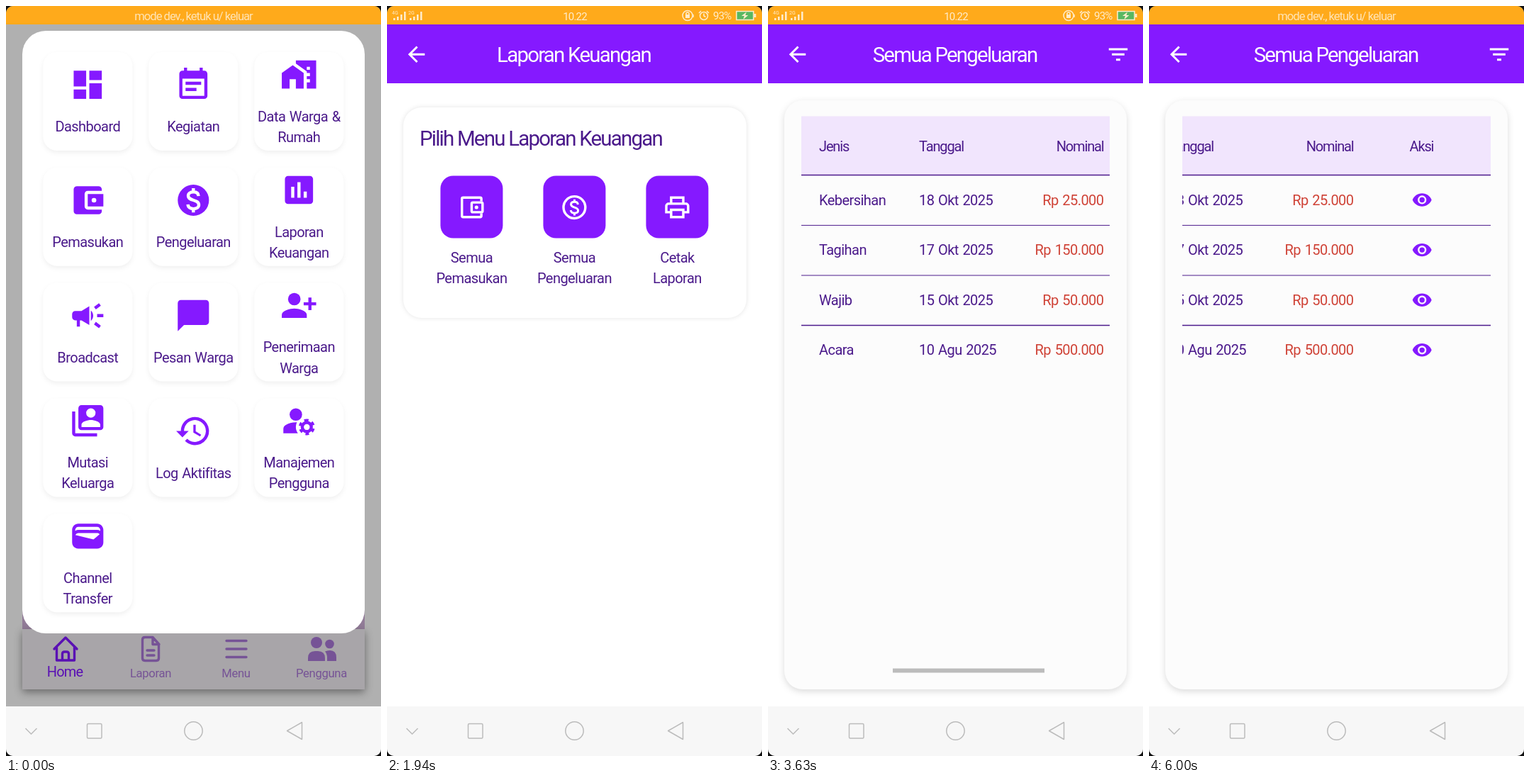
Recreate the animation shown at these times as an HTML page. Size 529 by 1058 pixels, loop 6.06 s.

```html
<!DOCTYPE html>
<html lang="id">
<head>
<meta charset="utf-8">
<title>Laporan Keuangan</title>
<style>
  html, body { margin: 0; width: 100%; height: 100%; overflow: hidden; background: #111; }
  svg { display: block; }
  #stage { width: 100%; height: 100%; }
  text { font: 20px Roboto, sans-serif; letter-spacing: -.55px; word-spacing: 1.2px; fill: #4b1a8b; }
  .mid { text-anchor: middle; }
  .end { text-anchor: end; }
  .title { font-size: 29.4px; letter-spacing: -1.75px; word-spacing: 0; }
  .bar .title { fill: #fff; }
  .head text { letter-spacing: -1.15px; }
  .red { fill: #cf4236; }
  .home { color: #5a10b4; }
  .tab { color: #765396; }
  .tab text { fill: currentColor; font-size: 16.6px; letter-spacing: -.3px; }
  .home text { fill: currentColor; letter-spacing: -.8px; }
  .tile { fill: #fff; filter: drop-shadow(0 3px 3px #0000000f); }
  .glow { fill: #fff; filter: drop-shadow(0 0 3px #0000001c); }
  .panel { fill: #fcfcfc; filter: drop-shadow(0 3px 5px #00000024); }
  .line { fill: none; stroke: currentColor; stroke-width: 2; }
  .bold { stroke-width: 3.4; stroke-linejoin: round; stroke-linecap: round; }
  .sys { fill: none; stroke: #bcbcbc; stroke-width: 1.5; stroke-linejoin: round; }
  .status text { fill: #fff; font-size: 15px; letter-spacing: -.8px; word-spacing: 0; }
  .status .dev { font-size: 16.6px; letter-spacing: -1px; }
  .status .net { font-size: 7px; letter-spacing: 0; }

  .dev, .info, .page, .scroll, .thumb, .thumb rect { animation: 6060ms linear infinite; }
  .dev { animation-name: dev; }
  .info { animation-name: info; }
  .page { transform-origin: 264px 507px; }
  #report { animation-name: openReport; }
  #list { animation-name: openList; }
  .scroll { animation-name: scroll; }
  .thumb { animation-name: thumbFade; }
  .thumb rect { animation-name: thumbMove; }

  @keyframes dev {
    0%, 9.9% { opacity: .68; } 13.4% { opacity: .3; }
    15.7%, 70.1% { opacity: 0; } 75%, 100% { opacity: .68; }
  }
  @keyframes info {
    0%, 23.1% { opacity: 0; } 29.7%, 64.4% { opacity: .78; } 69.3%, 100% { opacity: 0; }
  }
  @keyframes openReport {
    0%, 15% { opacity: 0; transform: scale(.9); animation-timing-function: ease-out; }
    20%, 100% { opacity: 1; transform: none; }
  }
  @keyframes openList {
    0%, 45.7% { opacity: 0; transform: scale(.9); animation-timing-function: ease-out; }
    50.7%, 100% { opacity: 1; transform: none; }
  }
  @keyframes scroll {
    0%, 53.5% { transform: translateX(0); animation-timing-function: ease-in-out; }
    59.9%, 60.6% { transform: translateX(-260px); animation-timing-function: ease-in-out; }
    68%, 100% { transform: translateX(-445px); }
  }
  @keyframes thumbMove {
    0%, 53.5% { transform: translateX(0); animation-timing-function: ease-in-out; }
    59.9%, 60.6% { transform: translateX(129px); animation-timing-function: ease-in-out; }
    68%, 100% { transform: translateX(221px); }
  }
  @keyframes thumbFade {
    0%, 52.8% { opacity: 0; } 53.6%, 77.9% { opacity: 1; } 82.4%, 100% { opacity: 0; }
  }
</style>
</head>
<body>
<svg id="stage" viewBox="0 0 529 1058" preserveAspectRatio="none">
  <defs>
    <clipPath id="screen"><rect width="529" height="1058" rx="10"/></clipPath>
    <clipPath id="body"><rect y="26" width="529" height="962"/></clipPath>
    <clipPath id="table"><rect x="47" y="155" width="435" height="790"/></clipPath>
  </defs>
  <g clip-path="url(#screen)">
    <rect width="529" height="1058" fill="#b0b0b0"/>
    <g clip-path="url(#body)">
      <g id="menu">
        <rect x="23" y="850" width="483" height="30" fill="#927c98"/>
        <rect x="23" y="879" width="483" height="85" fill="#a8a5a9" style="filter:drop-shadow(0 4px 6px #0006)"/>
        <g class="home">
          <path class="line bold" d="M68 907L84 891l16 16M71.5 905v18h25v-18M79.5 923v-9q0-3 3-3h3q3 0 3 3v9"/>
          <text class="mid" x="83" y="946">Home</text>
        </g>
        <g class="tab">
          <path class="line bold" d="M207 890.5h-11q-3.5 0-3.5 3.5v26q0 3.5 3.5 3.5h16q3.5 0 3.5-3.5v-20zv10h9M199 909h10M199 916h10M311 895.5h28M311 907h28M311 918.5h28"/>
          <g fill="currentColor">
            <circle cx="438" cy="898" r="8"/><circle cx="456.5" cy="900" r="6.3"/>
            <path d="M426 924v-4q0-10 10-10h4q10 0 10 10v4zM453 924v-5q0-5-3-8.500 3-1.500 7-1.500 9 0 9 10v5z"/>
          </g>
          <g id="tabs"></g>
        </g>
        <rect x="23" y="35" width="483" height="850" rx="33" fill="#fff"/>
        <g id="tiles"></g>
      </g>

      <g id="report" class="page">
        <rect y="26" width="529" height="962" fill="#fff"/>
        <g class="bar" data-title="Laporan Keuangan"></g>
        <rect class="glow" x="23" y="143" width="484" height="297" rx="26"/>
        <text class="title" x="46" y="197">Pilih Menu Laporan Keuangan</text>
        <g id="choices"></g>
      </g>

      <g id="list" class="page">
        <rect y="26" width="529" height="962" fill="#fff"/>
        <g class="bar" data-title="Semua Pengeluaran" data-filter="1"></g>
        <rect class="panel" x="23" y="133" width="483" height="831" rx="26"/>
        <g clip-path="url(#table)">
          <rect x="47" y="155.5" width="435" height="83" fill="#f1e5fd"/>
          <g stroke="#4c1a8b">
            <path d="M47 238.5h435M47 450.5h435" stroke-width="1.4"/>
            <path d="M47 309.4h435M47 380h435"/>
          </g>
          <g class="scroll" id="cells"></g>
        </g>
        <g class="thumb"><rect x="47" y="934.5" width="214" height="6" fill="#bcbcbc"/></g>
      </g>
    </g>

    <g class="status">
      <rect width="529" height="26" fill="#ffaa1b"/>
      <text class="dev mid" x="264.5" y="19.5">mode dev., ketuk u/ keluar</text>
      <g class="info">
        <g id="signals" fill="#fff"></g>
        <text class="mid" x="265" y="19.5">10.22</text>
        <g fill="none" stroke="#fff" stroke-width="1.5">
          <circle cx="424" cy="13.5" r="7"/><path d="M422 12v-2q2-2 4 0v2M432 12v4"/>
          <circle cx="447" cy="14" r="5.5"/><path d="M447 10.5V14l2.5 1.5M440 10l3-3M454 10l-3-3"/>
          <rect x="493" y="7.5" width="24" height="12" fill="#28bd77"/>
        </g>
        <path d="M421 12h6v5h-6zM518 11h2.5v5H518zM507 8.5l-7 5.5h4l-1.5 5 7-6h-4z" fill="#fff"/>
        <text x="460" y="18.8">93%</text>
      </g>
    </g>

    <rect y="988" width="529" height="70" fill="#f7f7f7"/>
    <g class="sys">
      <path d="M27.5 1019l8 8 8-8M417.5 1010.5v24l-21-12z"/>
      <rect x="114.5" y="1012.5" width="20.5" height="20.5" rx="1.5"/>
      <circle cx="264.5" cy="1022.5" r="12.7"/>
    </g>
  </g>
</svg>

<script>
const PURPLE = '#8519ff';
const path = d => `<path d="${d}"/>`;
const dollar = `<path class="line" d="M15.3 9.3C15.2 7.6 14 6.7 12.1 6.7 10.1 6.7 8.7 7.6 8.7 9.1c0 3.8 6.8 2 6.8 5.9 0 1.6-1.5 2.5-3.4 2.5-2.1 0-3.5-1-3.6-2.8M12 4.3V7M12 17.3v2.500"/>`;

// Every icon lives on a 24-unit grid.
const icons = {
  dashboard: path('M3 13h8V3H3v10zm0 8h8v-6H3v6zm10 0h8V11h-8v10zm0-18v6h8V3h-8z'),
  event: path('M17 10H7v2h10v-2zm2-7h-1V1h-2v2H8V1H6v2H5c-1.1 0-2 .9-2 2v14c0 1.1.9 2 2 2h14c1.1 0 2-.9 2-2V5c0-1.1-.9-2-2-2zm0 16H5V8h14v11zm-5-5H7v2h7v-2z'),
  house: path('M1 11v10h5v-6h4v6h5V11L8 6z') + path('M10 3v2l7 5v1h2v2h-2v2h2v2h-2v4h6V3H10zm9 6h-2V7h2v2z'),
  wallet: path('M21 18v1c0 1.1-.9 2-2 2H5c-1.1 0-2-.9-2-2V5c0-1.1.9-2 2-2h14c1.1 0 2 .9 2 2v1h-9c-1.1 0-2 .9-2 2v8c0 1.1.9 2 2 2h9zm-9-2h10V8H12v8zm4-2.5a1.5 1.5 0 1 1 0-3 1.5 1.5 0 0 1 0 3z'),
  coin: `<circle cx="12" cy="12" r="10"/><g color="#fff">${dollar}</g>`,
  chart: path('M19 3H5c-1.1 0-2 .9-2 2v14c0 1.1.9 2 2 2h14c1.1 0 2-.9 2-2V5c0-1.1-.9-2-2-2zM9 17H7v-7h2v7zm4 0h-2V7h2v10zm4 0h-2v-4h2v4z'),
  horn: path('M18 11v2h4v-2h-4zM16 17.6l3.2 2.4 1.2-1.6-3.2-2.4zM20.4 5.6L19.2 4 16 6.4 17.2 8zM4 9c-1.1 0-2 .9-2 2v2c0 1.1.9 2 2 2h1v4h2v-4h1l5 3V6L8 9H4zm11.5 3c0-1.3-.6-2.5-1.5-3.3v6.7c.9-.8 1.5-2 1.5-3.4z'),
  chat: path('M20 2H4c-1.1 0-2 .9-2 2v18l4-4h14c1.1 0 2-.9 2-2V4c0-1.1-.9-2-2-2z'),
  addPerson: `<circle cx="9" cy="8" r="4"/>` + path('M15 10v2h3v3h2v-3h3v-2h-3V7h-2v3h-3zM1 18v2h16v-2c0-2.7-5.3-4-8-4s-8 1.3-8 4z'),
  family: path('M4 6H2v14c0 1.1.9 2 2 2h14v-2H4V6zm16-4H8c-1.1 0-2 .9-2 2v12c0 1.1.9 2 2 2h12c1.1 0 2-.9 2-2V4c0-1.1-.9-2-2-2zm-6 2a3 3 0 1 1 0 6 3 3 0 0 1 0-6zm6 12H8v-1.5c0-2 4-3 6-3s6 1 6 3V16z'),
  history: path('M13 3c-5 0-9 4-9 9H1l4 4 4-4H6a7 7 0 1 1 2.06 4.94l-1.42 1.42A9 9 0 1 0 13 3zm-1 5v5l4.3 2.5.7-1.2-3.5-2.1V8H12z'),
  manage: `<circle cx="10" cy="8" r="4"/>` + path('M10.7 13c-3-.1-5.3.6-7.3 1.8-.9.5-1.4 1.5-1.4 2.5V20h9.3c-1.6-2.2-1.6-4.9-.6-7z') +
    `<g class="line"><circle cx="17" cy="16" r="2.9"/><circle cx="17" cy="16" r="4.2" pathLength="12" stroke-dasharray="1" stroke-dashoffset=".5" transform="rotate(-90 17 16)"/></g>`,
  transfer: path('M18 4H6C3.8 4 2 5.8 2 8v8c0 2.2 1.8 4 4 4h12c2.2 0 4-1.8 4-4V8c0-2.2-1.8-4-4-4zm-1.9 9.8c-.2.2-.6.3-.9.2L4.1 11.3C4.5 10.5 5.2 10 6 10h12c.7 0 1.3.3 1.6.8zM6 6h12c1.1 0 2 .9 2 2v.6c-.6-.4-1.3-.6-2-.6H6c-.7 0-1.4.2-2 .6V8c0-1.1.9-2 2-2z'),
  walletLine: `<path class="line" d="M20 7V5a1 1 0 0 0-1-1H5a1 1 0 0 0-1 1v14a1 1 0 0 0 1 1h14a1 1 0 0 0 1-1v-2"/><rect class="line" x="12" y="8" width="9" height="8" rx="1"/><circle cx="16" cy="12" r="1.5"/>`,
  coinLine: `<circle class="line" cx="12" cy="12" r="9"/><g transform="translate(1.7 1.7) scale(.86)">${dollar}</g>`,
  print: path('M19 8h-1V3H6v5H5c-1.7 0-3 1.3-3 3v6h4v4h12v-4h4v-6c0-1.7-1.3-3-3-3zM8 5h8v3H8V5zm8 12v2H8v-4h8v2zm2-2v-2H6v2H4v-4c0-.6.4-1 1-1h14c.6 0 1 .4 1 1v4h-2z'),
  back: path('M20 11H7.8l5.6-5.6L12 4l-8 8 8 8 1.4-1.4L7.8 13H20v-2z'),
  filter: path('M10 18h4v-2h-4v2zM3 6v2h18V6H3zm3 7h12v-2H6v2z'),
  eye: path('M12 4.5C7 4.5 2.7 7.6 1 12c1.7 4.4 6 7.5 11 7.5s9.3-3.1 11-7.5c-1.7-4.4-6-7.5-11-7.5zM12 17a5 5 0 1 1 0-10 5 5 0 0 1 0 10z') + `<circle cx="12" cy="12" r="3"/>`
};

const icon = (name, x, y, size, color) =>
  `<svg x="${x - size / 2}" y="${y - size / 2}" width="${size}" height="${size}" viewBox="0 0 24 24" fill="${color}" color="${color}">${icons[name]}</svg>`;
const text = (str, x, y, cls = '') =>
  `<text class="${cls}" x="${x}" y="${y + 7}">${str.replace('&', '&amp;')}</text>`;
const fill = (id, parts) => document.getElementById(id).innerHTML = parts.join('');

const entries = [
  ['dashboard', 'Dashboard'], ['event', 'Kegiatan'], ['house', 'Data Warga &', 'Rumah'],
  ['wallet', 'Pemasukan'], ['coin', 'Pengeluaran'], ['chart', 'Laporan', 'Keuangan'],
  ['horn', 'Broadcast'], ['chat', 'Pesan Warga'], ['addPerson', 'Penerimaan', 'Warga'],
  ['family', 'Mutasi', 'Keluarga'], ['history', 'Log Aktifitas'], ['manage', 'Manajemen', 'Pengguna'],
  ['transfer', 'Channel', 'Transfer']
];
fill('tiles', entries.map(([name, ...lines], i) => {
  const x = 115.3 + i % 3 * 149, top = 65 + Math.floor(i / 3) * 162.8;
  const y = top + (lines.length > 1 ? 31.7 : 46.2);
  return `<rect class="tile" x="${x - 63}" y="${top}" width="126" height="139" rx="20"/>` +
    icon(name, x, y, 52.9, PURPLE) +
    lines.map((line, n) => text(line, x, y + 59 + n * 29.3, 'mid')).join('');
}));

fill('tabs', [['Laporan', 204], ['Menu', 324.5], ['Pengguna', 445]].map(([label, x]) =>
  `<text class="mid" x="${x}" y="946.5">${label}</text>`));

const choices = [
  ['walletLine', 'Semua', 'Pemasukan'], ['coinLine', 'Semua', 'Pengeluaran'], ['print', 'Cetak', 'Laporan']
];
fill('choices', choices.map(([name, first, second], i) => {
  const x = 119.4 + i * 145;
  return `<rect x="${x - 44}" y="239.5" width="88" height="88" rx="18" fill="${PURPLE}"/>` +
    icon(name, x, 284, 41.1, '#fff') + text(first, x, 354.5, 'mid') + text(second, x, 384, 'mid');
}));

document.querySelectorAll('.bar').forEach(bar => {
  bar.innerHTML = `<rect y="26" width="529" height="83" fill="${PURPLE}"/>` +
    icon('back', 41.5, 68.3, 35.3, '#fff') +
    `<text class="title mid" x="263.5" y="79">${bar.dataset.title}</text>` +
    (bar.dataset.filter ? icon('filter', 494, 68.3, 35.3, '#fff') : '');
});

const columns = [82, 146, 332, 473, 733.5];
const rows = [
  ['1', 'Kerja bakti', 'Kebersihan', '18 Okt 2025', 'Rp 25.000'],
  ['2', 'Tagihan listrik', 'Tagihan', '17 Okt 2025', 'Rp 150.000'],
  ['3', 'Iuran wajib', 'Wajib', '15 Okt 2025', 'Rp 50.000'],
  ['4', 'Acara warga', 'Acara', '10 Agu 2025', 'Rp 500.000']
];
const cells = (row, y, lastClass) =>
  row.map((str, i) => text(str, columns[i], y, i === 4 ? lastClass : '')).join('');
fill('cells', [
  `<g class="head">${cells(['No', 'Nama', 'Jenis', 'Tanggal', 'Nominal'], 197.5, 'end')}${text('Aksi', 812.5, 197.5)}</g>`,
  ...rows.map((row, i) => {
    const y = 273.5 + i * 70.6;
    return cells(row, y, 'end red') + icon('eye', 830.2, y, 29.4, PURPLE);
  })
]);

fill('signals', [7, 30].map((x, n) =>
  `<text class="net" x="${x}" y="12">${n ? '2G' : '4G'}</text>` +
  [3, 5, 8, 12].map((h, i) => `<rect x="${x + 2 + i * 5}" y="${20 - h}" width="2.5" height="${h}"/>`).join('')));
</script>
</body>
</html>
```
